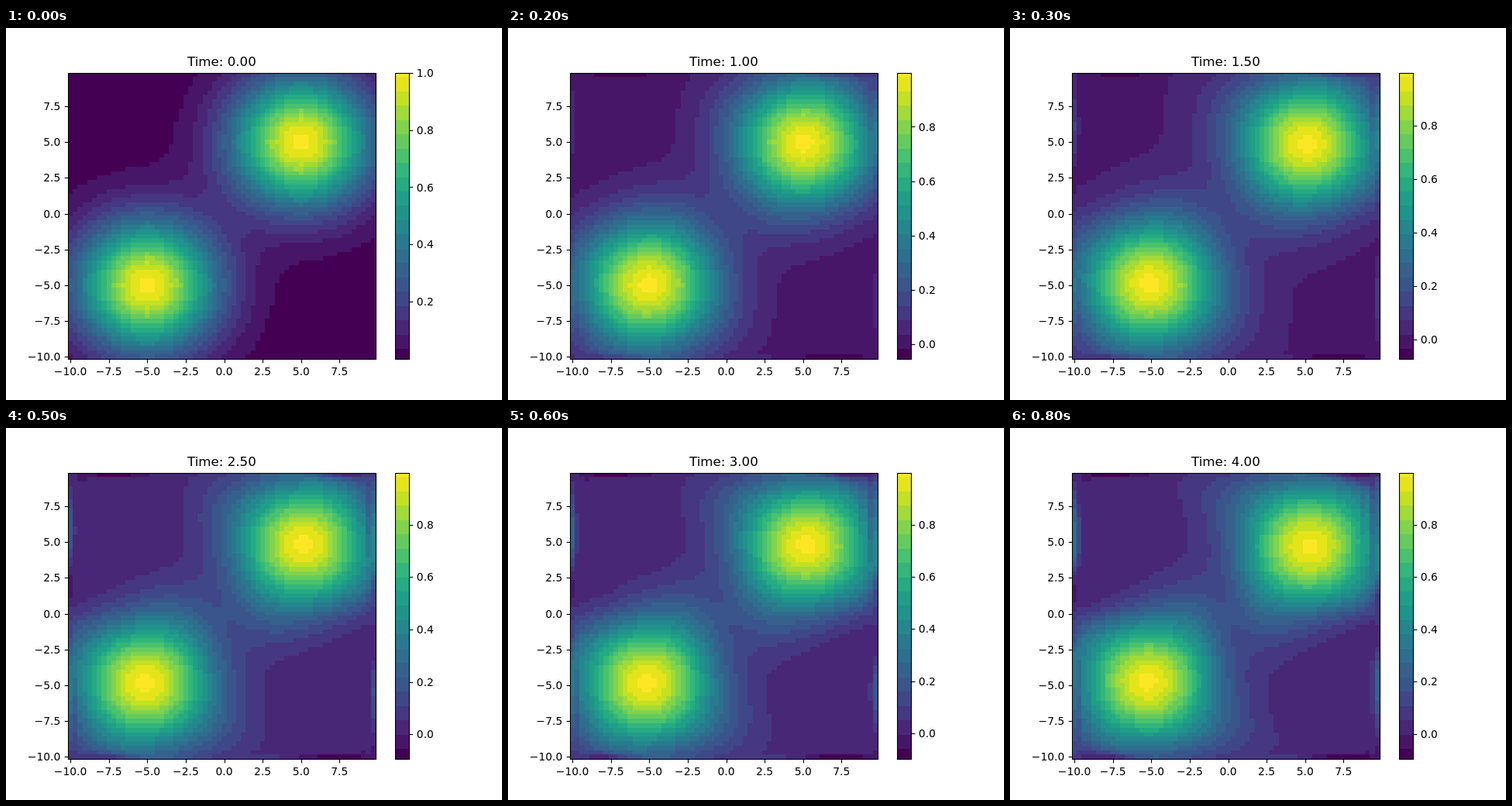
An HTML page with a canvas for the animation above (0.9 s loop, 640 by 480 pixels).

```html
<!DOCTYPE html>
<html lang="en">
<head>
<meta charset="utf-8">
<title>Vorticity</title>
<style>
  html, body { margin: 0; width: 100%; height: 100%; overflow: hidden; background: #fff; }
  canvas { display: block; }
</style>
</head>
<body>
<canvas id="stage" width="640" height="480"></canvas>
<script>
const ctx = document.getElementById('stage').getContext('2d');

// ---- Vorticity equation on a periodic square, side 20 ----
const N = 64, SIDE = 20, H = SIDE / N, VISCOSITY = 0.001;
const FRAMES = 9, FRAME_MS = 100, FRAME_TIME = 0.5, SUBSTEPS = 4;

const field = fn => Float64Array.from({ length: N * N }, (_, i) => fn(i % N, Math.floor(i / N)));

// Orthonormal Hartley matrix: symmetric and its own inverse
const hartley = field((i, j) => {
  const a = 2 * Math.PI * i * j / N;
  return (Math.cos(a) + Math.sin(a)) / Math.sqrt(N);
});

function multiply(a, b) {
  const out = new Float64Array(N * N);
  for (let i = 0; i < N; i++)
    for (let k = 0; k < N; k++) {
      const s = a[i * N + k];
      for (let j = 0; j < N; j++) out[i * N + j] += s * b[k * N + j];
    }
  return out;
}

const transform = a => multiply(multiply(hartley, a), hartley);
const waveNumber = i => (i < N / 2 ? i : i - N) * 2 * Math.PI / SIDE;
const inverseLaplacian = field((i, j) =>
  i || j ? -1 / (waveNumber(i) ** 2 + waveNumber(j) ** 2) : 0);

function rate(w) {
  const psi = transform(transform(w).map((v, i) => v * inverseLaplacian[i]));
  const out = new Float64Array(N * N);
  for (let y = 0; y < N; y++) {
    const row = y * N, up = (y + 1) % N * N, down = (y + N - 1) % N * N;
    for (let x = 0; x < N; x++) {
      const right = row + (x + 1) % N, left = row + (x + N - 1) % N;
      const dx = a => (a[right] - a[left]) / (2 * H);
      const dy = a => (a[up + x] - a[down + x]) / (2 * H);
      const laplacian = (w[right] + w[left] + w[up + x] + w[down + x] - 4 * w[row + x]) / (H * H);
      out[row + x] = VISCOSITY * laplacian - dy(psi) * dx(w) + dx(psi) * dy(w);
    }
  }
  return out;
}

// Fourth-order Runge-Kutta
function advance(w, dt) {
  const shifted = (k, s) => w.map((v, i) => v + s * k[i]);
  const k1 = rate(w);
  const k2 = rate(shifted(k1, dt / 2));
  const k3 = rate(shifted(k2, dt / 2));
  const k4 = rate(shifted(k3, dt));
  return w.map((v, i) => v + dt / 6 * (k1[i] + 2 * k2[i] + 2 * k3[i] + k4[i]));
}

function simulate() {
  const vortex = (x, y, c) => Math.exp(-((x - c) ** 2 + (y - c) ** 2) / 20);
  let w = field((i, j) => {
    const x = i * H - 10, y = j * H - 10;
    return vortex(x, y, 5) + vortex(x, y, -5);
  });
  const states = [w];
  while (states.length < FRAMES) {
    for (let s = 0; s < SUBSTEPS; s++) w = advance(w, FRAME_TIME / SUBSTEPS);
    states.push(w);
  }
  return states;
}

// ---- Colours: a smooth scale cut into flat bands ----
const SCALE = ('440154 471365 482475 463480 414487 3b528b 355f8d 2f6c8e 2a788e 25848e 21918c ' +
  '1e9c89 22a884 2fb47c 44bf70 5ec962 7ad151 9bd93c bddf26 dfe318 fde725')
  .split(' ').map(hex => [0, 2, 4].map(i => parseInt(hex.slice(i, i + 2), 16)));
const BANDS = 21, FIRST_EDGE = 0.035, BAND = 0.05;

const bandEdge = k => k <= 0 ? 0 : Math.min(1, FIRST_EDGE + (k - 1) * BAND);

function scaleColor(v) {
  const p = v * (SCALE.length - 1), i = Math.min(Math.floor(p), SCALE.length - 2);
  const rgb = SCALE[i].map((c, n) => Math.round(c + (SCALE[i + 1][n] - c) * (p - i)));
  return `rgb(${rgb})`;
}

const bandColors = Array.from({ length: BANDS }, (_, k) =>
  scaleColor(k === 0 ? 0 : k === BANDS - 1 ? 1 : (bandEdge(k) + bandEdge(k + 1)) / 2));

const bandOf = v => Math.max(0, Math.min(BANDS - 1, Math.floor((v - FIRST_EDGE) / BAND) + 1));

// ---- Drawing ----
const LEFT = 80, TOP = 57.6, WIDTH = 396.8, HEIGHT = 369.6, BOTTOM = TOP + HEIGHT;
const BAR_LEFT = 501.6, BAR_RIGHT = 520.08, TICK = 4.86, LABEL_GAP = 9.72, DIGIT_HALF = 5.06;
const snap = v => Math.round(v) + 0.5;
const plotX = v => LEFT + (v + 10 + H / 2) / SIDE * WIDTH;
const plotY = v => BOTTOM - (v + 10 + H / 2) / SIDE * HEIGHT;
const cellX = i => Math.round(LEFT + WIDTH * i / N);
const cellY = j => Math.round(BOTTOM - HEIGHT * j / N);

function line(x1, y1, x2, y2) {
  ctx.beginPath();
  ctx.moveTo(x1, y1);
  ctx.lineTo(x2, y2);
  ctx.stroke();
}

function box(left, right) {
  const x = snap(left), y = snap(TOP);
  ctx.strokeRect(x, y, snap(right) - x, snap(BOTTOM) - y);
}

function label(text, x, y, align, size = 13.889) {
  ctx.font = `${size}px "DejaVu Sans", sans-serif`;
  ctx.textAlign = align;
  ctx.fillText(text, x, y);
}

function drawAxes() {
  for (let v = -10; v < 9; v += 2.5) {
    const text = v.toFixed(1).replace('-', '\u2212');
    const x = snap(plotX(v)), y = snap(plotY(v));
    line(x, 428, x, 427.5 + TICK);
    line(80, y, 80.5 - TICK, y);
    label(text, plotX(v), 447.7, 'center');
    label(text, LEFT - LABEL_GAP, plotY(v) + DIGIT_HALF, 'right');
  }
  box(LEFT, LEFT + WIDTH);
}

function drawColorbar(min, max) {
  const barY = v => BOTTOM - HEIGHT * v;
  for (let k = 0; k < BANDS; k++) {
    const y = Math.round(barY(bandEdge(k + 1)));
    ctx.fillStyle = bandColors[k];
    ctx.fillRect(502, y, 18, Math.round(barY(bandEdge(k))) - y);
  }
  ctx.fillStyle = '#000';
  for (let k = 0; k <= 5; k++) {
    const v = k / 5;
    if (v < min || v > max) continue;
    const y = barY((v - min) / (max - min));
    line(520.5, snap(y), 520.5 + TICK, snap(y));
    label(v.toFixed(1), BAR_RIGHT + LABEL_GAP, y + DIGIT_HALF, 'left');
  }
  box(BAR_LEFT, BAR_RIGHT);
}

function draw(w, time) {
  const min = Math.min(...w), max = Math.max(...w);
  ctx.fillStyle = '#fff';
  ctx.fillRect(0, 0, 640, 480);
  for (let j = 0; j < N; j++)
    for (let i = 0; i < N; i++) {
      const x = cellX(i), y = cellY(j + 1);
      ctx.fillStyle = bandColors[bandOf((w[j * N + i] - min) / (max - min))];
      ctx.fillRect(x, y, cellX(i + 1) - x, cellY(j) - y);
    }
  ctx.strokeStyle = ctx.fillStyle = '#000';
  ctx.lineWidth = 1.11;
  drawAxes();
  drawColorbar(min, max);
  label(`Time: ${time.toFixed(2)}`, LEFT + WIDTH / 2, 49.2, 'center', 16.667);
}

const states = simulate();
const start = performance.now();
let shown = -1;

function tick() {
  const frame = Math.floor((performance.now() - start) / FRAME_MS) % FRAMES;
  if (frame !== shown) draw(states[frame], frame * FRAME_TIME);
  shown = frame;
  requestAnimationFrame(tick);
}
tick();
</script>
</body>
</html>
```
